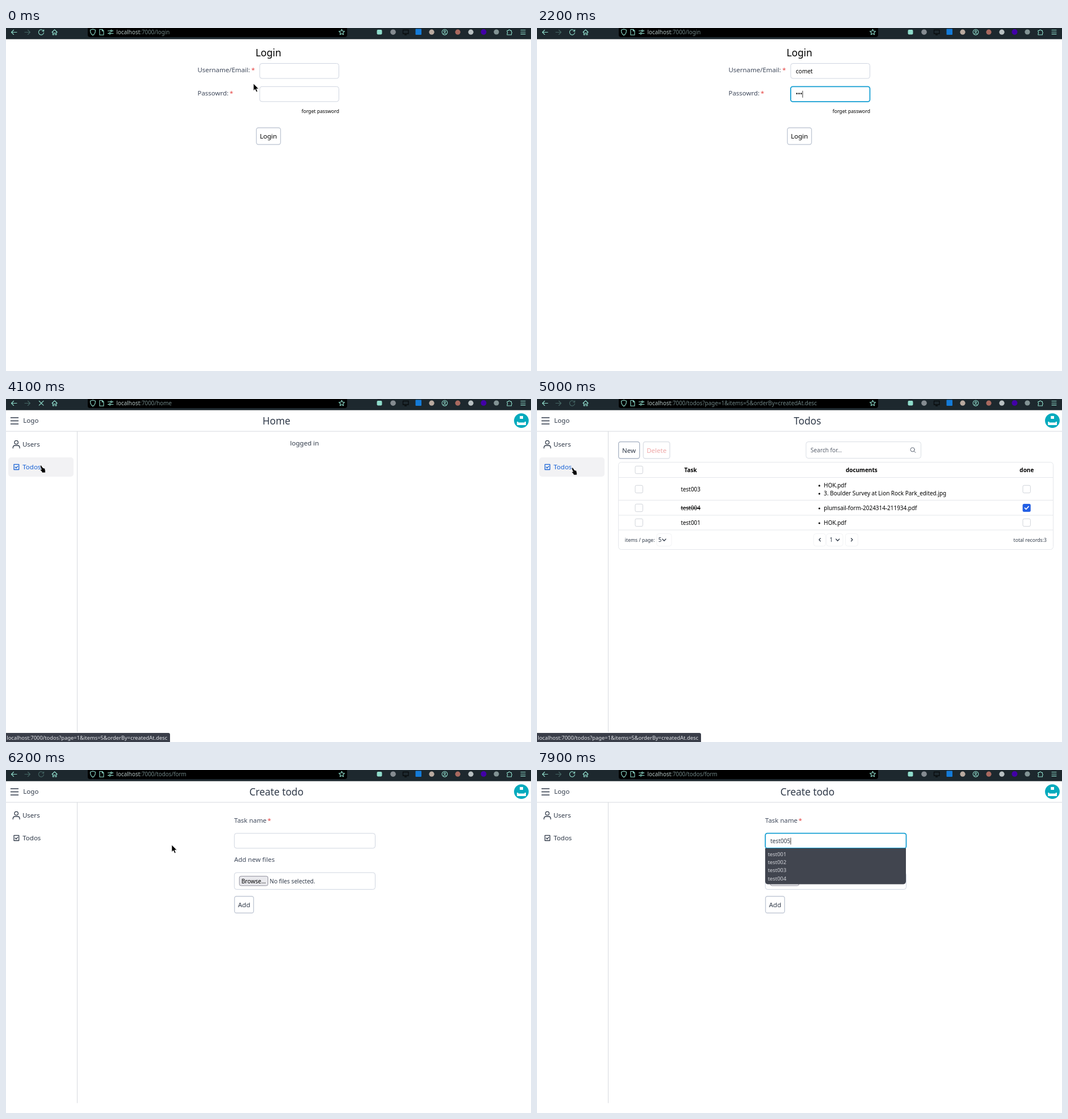
Write an HTML page that moves like this. It is 925 px wide and 605 px high and loops after 8000 ms.

```html
<!DOCTYPE html>
<html lang="en">
<head>
<meta charset="utf-8">
<title>Todo app</title>
<style>
html, body { margin: 0; width: 100%; height: 100%; overflow: hidden; background: #fff; }
svg { display: block; width: 925px; height: 605px; }
text { font: 11.56px "Noto Sans", "Open Sans", sans-serif; white-space: pre; }
.ink { fill: #303a49; }
.title { font-size: 17.3px; text-anchor: middle; }
.label { font-size: 11.45px; font-weight: 500; fill: #404a5c; }
.star { fill: #e5413f; }
.small { font-size: 10.12px; }
.tiny { font-size: 8.65px; }
.row { font-size: 9.95px; font-weight: 500; }
.head { font-size: 10px; font-weight: 700; text-anchor: middle; }
.mid { text-anchor: middle; }
.end { text-anchor: end; }
.box { fill: #fff; stroke: #cfd5e0; }
.btn { fill: #fff; stroke: #c3cad6; stroke-width: 1.4; }
.rule { fill: none; stroke: #e4e7eb; }
.focus { fill: #fff; stroke: #159fd3; stroke-width: 1.8; }
.line { fill: none; stroke: #303a49; stroke-width: 1.3; stroke-linecap: round; stroke-linejoin: round; }
.bar { fill: none; stroke: #8fdccb; stroke-width: 1.1; stroke-linecap: round; stroke-linejoin: round; }
.dim { opacity: .35; }
.pop { fill: #41454f; }
.pop-text text { font-size: 9.4px; fill: #d3d5da; }
.status text { font-size: 9.37px; fill: #e4e6ea; }
.status path { fill: #3a3e49; }
.url { font-size: 9.88px; fill: #6f8585; }
.url tspan { fill: #b9cac8; }
.check { fill: #fff; stroke: #d0d4da; }
.caret { stroke: #000; stroke-width: .8; }
.hot .ink { fill: #1a63d6; }
.hot .line { stroke: #1a63d6; }
</style>
</head>
<body>
<!-- data-on lists the spans, in ms, during which an element shows -->
<svg viewBox="0 0 925 605">
  <defs>
    <g id="tick"><path d="M-3.2 .2L-1 2.5 3.4-2.4" fill="none" stroke="#fff" stroke-width="1.7" stroke-linecap="round" stroke-linejoin="round"/></g>
    <rect id="check" class="check" x="-6.7" y="-6.7" width="13.4" height="13.4" rx="2.4"/>
    <path id="down" class="line" d="M-3-1.5L0 1.7 3-1.5"/>
  </defs>
  <rect width="925" height="605" fill="#fff"/>

  <!-- Browser bar -->
  <rect width="925" height="19.7" fill="#1d282e"/>
  <path d="M144 0H601V12a4 4 0 0 1-4 4H148a4 4 0 0 1-4-4Z"/>
  <g class="bar">
    <path d="M19 7.5H9.5M13.5 3.5L9.5 7.5 13.5 11.5"/>
    <path class="dim" d="M33 7.5H42.5M38.5 3.5L42.5 7.5 38.5 11.5"/>
    <g data-on="0-4100 4500-5400 5700-8000"><path id="reload" d="M66 5.2A4.6 4.6 0 1 0 66.6 8M66.6 3V5.8H63.8"/></g>
    <path data-on="4100-4500 5400-5700" d="M58.3 3.5L66 11.2M66 3.5L58.3 11.2"/>
    <path d="M81 7.5L85.6 3 90.2 7.5M82.4 6.8V12H84.3V8.8H87V12H88.8V6.8"/>
    <path d="M153 2L157.5 3.6C157.6 8 156.3 11 153 12.8 149.700 11 148.400 8 148.500 3.600Z"/>
    <path d="M165 2.5H169.500L172 5V12.300H165ZM169.300 2.700V5.200H171.800"/>
    <path d="M179.500 5H184M187 5H189M179.500 9.500H181.500M184.500 9.500H189"/><circle cx="185.500" cy="5" r="1.400"/><circle cx="183" cy="9.500" r="1.400"/>
    <path id="fav" d=""/>
    <circle cx="773" cy="7.300" r="4.800"/><circle cx="773" cy="6" r="1.500"/><path d="M770.300 10.500Q773 7.500 775.700 10.500"/>
    <path d="M883 4.500H885.300A1.500 1.500 0 0 1 888.300 4.500H890.500V7A1.500 1.500 0 0 1 890.500 9.700V12H883V9.700A1.500 1.500 0 0 0 883 7Z"/>
    <path d="M907 3.800H915M907 7.200H915M907 10.600H915"/>
  </g>
  <rect x="653.500" y="3" width="9" height="8.500" rx="2" fill="#8fdccb"/>
  <circle cx="682" cy="7.200" r="4.800" fill="#858c91"/>
  <path d="M699.500 3.500H709V10H699.500ZM702 12H706" fill="none" stroke="#080c0e" stroke-width="1.300"/>
  <rect x="721.500" y="1.500" width="10.500" height="10.500" rx="1" fill="#147bd8"/>
  <circle cx="750" cy="7.200" r="4.600" fill="#b9aaa0"/>
  <circle cx="796" cy="7.200" r="4.600" fill="#a9695f"/>
  <circle cx="819" cy="7.200" r="4.600" fill="#b8c0c2"/>
  <circle cx="841.500" cy="7" r="5" fill="#4200a8"/>
  <circle cx="864" cy="7" r="4.600" fill="#829394"/>
  <text class="url" x="194.500" y="11"><tspan>localhost</tspan>:7000/<tspan id="path" style="fill:inherit"></tspan></text>

  <!-- Login -->
  <g data-on="0-2500">
    <text class="title" x="462.300" y="49.500">Login</text>
    <text class="label" x="337.500" y="78">Username/Email:</text><text class="label star" x="432.300" y="78">*</text>
    <text class="label" x="337.500" y="119">Passowrd:</text><text class="label star" x="394" y="119">*</text>
    <rect class="box" x="447" y="62.500" width="139.500" height="26.500" rx="4"/>
    <rect class="box" x="447" y="103.300" width="139.500" height="26.500" rx="4"/>
    <rect class="focus" data-on="300-1600" x="447" y="62.500" width="139.500" height="26.500" rx="3.600"/>
    <rect class="focus" data-on="1600-2500" x="447" y="103.300" width="139.500" height="26.500" rx="3.600"/>
    <text class="tiny end" x="587" y="150">forget password</text>
    <rect class="btn" x="441.200" y="176" width="42.500" height="29.500" rx="3.500"/>
    <text class="mid" x="462.300" y="194.500">Login</text>
  </g>

  <!-- App shell -->
  <g data-on="2500-8000">
    <path class="line" d="M8.500 33H21.500M8.500 38.500H21.500M8.500 44H21.500" style="stroke-width:1.600"/>
    <text class="ink" x="30.300" y="42.300">Logo</text>
    <text class="ink title" id="title" x="476.500" y="45"></text>
    <circle cx="908" cy="38.200" r="12.900" fill="#04aabd"/>
    <path d="M905.300 30H911V35H905.300ZM900.300 40H902.500V41.500H913.700V40H916V46H900.300Z" fill="#fff"/>
    <path d="M0 57H925M125.500 57V587.500" class="rule" style="stroke:#d6d9de"/>
    <g class="line"><circle cx="18.200" cy="76.500" r="3.200"/><path d="M12.300 86.700V85.500Q12.600 82 16 82H20.500Q23.800 82 24.100 85.500V86.700"/></g>
    <text class="ink" x="28.900" y="84.400">Users</text>
    <rect data-on="3700-5100" x="4" y="103" width="115" height="34" rx="5" fill="#f2f2f4"/>
    <g id="todos">
      <path class="line" d="M14 115.400H22.700V124.500H14ZM16.200 120L17.900 121.700 20.800 118.400"/>
      <text class="ink" x="29.200" y="124">Todos</text>
    </g>
  </g>
  <text class="ink" data-on="2500-4500" x="500.500" y="82">logged in</text>

  <!-- Todo list -->
  <g data-on="4500-5700">
    <rect class="btn" x="143.700" y="75.500" width="37" height="29.500" rx="3.500" style="stroke:#aeb8c8"/>
    <text class="ink mid" x="162" y="94.500">New</text>
    <rect class="btn" x="187.300" y="75.500" width="46.700" height="29.500" rx="3.500" style="stroke:#dde1e7"/>
    <text class="mid" x="210.700" y="94.500" fill="#efa6a6">Delete</text>
    <rect class="box" x="474" y="75.500" width="202.500" height="29" rx="4" style="stroke:#dadee4"/>
    <text class="small" x="482" y="94" fill="#59616e">Search for...</text>
    <g class="line" style="stroke:#5d6674;stroke-width:1"><circle cx="661.700" cy="89.300" r="3.600"/><path d="M664.400 92L667 94.600"/></g>
    <rect class="rule" x="143.500" y="111.500" width="766" height="154" rx="5"/>
    <path class="rule" d="M143.500 138.500H909.500M143.500 178.500H909.500M143.500 205H909.500M143.500 231H909.500"/>
    <text class="head" x="270.700" y="129">Task</text>
    <text class="head" x="571.800" y="129">documents</text>
    <text class="head" x="862.800" y="129">done</text>
    <use href="#check" x="179.700" y="125"/>
    <g id="rows"></g>
    <g transform="translate(862.700 192)"><rect x="-7" y="-7" width="14" height="14" rx="2.500" fill="#235fe5"/><use href="#tick"/></g>
    <g fill="none" stroke="#f2f3f5"><rect x="211" y="237.500" width="26" height="22" rx="4"/><rect x="487.500" y="237.500" width="21" height="22" rx="4"/><rect x="510" y="237.500" width="29" height="22" rx="4"/><rect x="543.500" y="237.500" width="22" height="22" rx="4"/></g>
    <text class="tiny ink" x="154.800" y="251.500">items / page:</text>
    <text class="small ink" x="213.800" y="252.300">5</text><use href="#down" x="224" y="248.500"/>
    <path class="line" d="M499.300 245.800L497 248.300 499.300 250.800M553.600 245.800L555.900 248.300 553.600 250.800"/>
    <text class="small ink" x="515.500" y="252.300">1</text><use href="#down" x="529.700" y="248.500"/>
    <text class="tiny ink end" x="898" y="251.500">total records:3</text>
  </g>

  <!-- New todo form -->
  <g data-on="5700-8000">
    <text class="label" x="402" y="93">Task name</text><text class="label star" x="460.700" y="93">*</text>
    <rect class="box" x="402.300" y="111.700" width="248.200" height="26.300" rx="4"/>
    <rect class="focus" data-on="6400-8000" x="402.300" y="111.700" width="248.200" height="26.300" rx="3.600"/>
    <text class="label" x="402" y="162">Add new files</text>
    <rect class="box" x="402.300" y="181" width="248.200" height="29.600" rx="4"/>
    <rect x="411.200" y="187.300" width="50.300" height="16.700" rx="2.800" fill="#e9e9ed" stroke="#8f8f9b"/>
    <text class="small mid" x="436.300" y="199.700">Browse...</text>
    <text class="small ink" x="464.500" y="199.700">No files selected.</text>
    <rect class="btn" x="402.600" y="222.800" width="33.700" height="29.500" rx="3.500"/>
    <text class="ink mid" x="419.500" y="242">Add</text>
  </g>

  <g id="popups"></g>
  <text class="small" id="user" x="456" y="79.700"></text>
  <text class="small" id="pass" x="456" y="120.300"></text>
  <text class="small ink" id="task" x="411.200" y="129"></text>
  <path class="caret" id="caret" d="M0-9.500V2.500"/>

  <g class="status" data-on="3800-5100"><path d="M0 589H286a3 3 0 0 1 3 3V605H0Z"/><text x="1.300" y="600.700">localhost:7000/todos?page=1&amp;items=5&amp;orderBy=createdAt.desc</text></g>
  <g class="status" data-on="5200-5700"><path d="M0 589H119a3 3 0 0 1 3 3V605H0Z"/><text x="1.300" y="600.700">localhost:7000/todos/form</text></g>

  <g id="cursor" stroke="#fff" stroke-width=".7" stroke-linejoin="round">
    <path id="arrow" d="M0 0V12.500L2.900 9.900 5 14.800 7.200 13.900 5.200 9.200H9Z"/>
    <path id="hand" d="M.3.500Q1.500-.5 2.500.7L5 4.500 8.500 5.500 9.300 9.500V13H3.500L3 11 .2 8.300Q.3 7 1.700 7.300L2.500 7.500.6 3Z"/>
    <path id="beam" d="M-2.500-6H-.5L0-5.500.5-6H2.500M0-5.500V5.500M-2.500 6H-.5L0 5.500.5 6H2.500" fill="none" stroke="#111" stroke-width="1.100"/>
  </g>
</svg>
<script>
const LOOP = 8000, STEP = 100;
const $ = id => document.getElementById(id);

// Five-pointed bookmark star
$("fav").setAttribute("d", "M" + Array.from({ length: 10 }, (_, i) => {
  const r = i % 2 ? 2.4 : 5.2, a = (i / 5 - .5) * Math.PI;
  return `${591.5 + r * Math.cos(a)} ${7.5 + r * Math.sin(a)}`;
}).join("L") + "Z");

// Table rows: centre line, task, documents
const rows = [
  [159, "test003", ["HOK.pdf", "3. Boulder Survey at Lion Rock Park_edited.jpg"]],
  [192, "test004", ["plumsail-form-2024314-211934.pdf"]],
  [218, "test001", ["HOK.pdf"]]
];
$("rows").innerHTML = rows.map(([y, task, docs], i) => {
  const strike = i === 1 ? ' text-decoration="line-through"' : "";
  const list = docs.map((doc, n) => {
    const base = y + 4 + (n - (docs.length - 1) / 2) * 14.2;
    return `<circle cx="497.5" cy="${base - 3}" r="1.6"/><text class="row" x="505.3" y="${base}">${doc}</text>`;
  }).join("");
  return `<use href="#check" x="179.700" y="${y}"/><use href="#check" x="862.700" y="${y}"/>` +
    `<text class="row mid" x="270.700" y="${y + 4}"${strike}>${task}</text>${list}`;
}).join("");

// Suggestion lists under the focused field
function popup(on, x, y, width, names) {
  const h = names.length * 14.1 + 7.2, w = width - 10;
  const items = names.map((name, i) => `<text x="${x + 4.7}" y="${y + 14.2 + i * 14.1}">${name}</text>`).join("");
  return `<g class="pop-text" data-on="${on}"><path class="pop" d="M${x} ${y}h${width}v${h - 5}a5 5 0 0 1-5 5h${-w}a5 5 0 0 1-5-5Z"/>${items}</g>`;
}
const users = ["comet", "comnet", "cedar", "cello", "cobalt", "candle"];
const tasks = ["test001", "test002", "test003", "test004", "test1", "test"];
$("popups").innerHTML =
  popup("1000-1200", 446, 89, 140, users) +
  popup("1200-1500", 446, 89, 140, users.slice(0, 2)) +
  popup("6600-7700", 402, 138, 248, tasks) +
  popup("7700-8000", 402, 138, 248, tasks.slice(0, 4));

// Tracks of [start, value]; the latest started one holds
const pick = (track, t) => track.filter(k => k[0] <= t).pop()[1];
const tracks = {
  path: [[0, "login"], [2500, "home"], [4500, "todos?page=1&items=5&orderBy=createdAt.desc"], [5700, "todos/form"]],
  title: [[0, ""], [2500, "Home"], [4500, "Todos"], [5700, "Create todo"]],
  user: [[0, ""], [900, "c"], [1100, "co"], [1300, "com"], [1400, "come"], [1500, "comet"], [2500, ""]],
  pass: [[0, ""], ...[1, 2, 3, 4, 5].map(n => [1900 + n * 100, "•".repeat(n)]), [2500, ""]],
  task: [[0, ""], [6500, "t"], [6600, "te"], [6700, "tes"], [6800, "test"], [7700, "test0"], [7800, "test00"], [7900, "test005"]]
};
const focus = [[0, ""], [300, "user"], [1600, "pass"], [2500, ""], [6400, "task"]];

// Pointer poses: time, x, y, shape
const poses = [
  [0, 436, 98, "arrow"], [200, 455, 82, "beam"], [300, 462, 78, "beam"], [900, 462, 78, ""],
  [2600, 474, 75, "arrow"], [2700, 481, 71, "arrow"], [3100, 481, 71, "arrow"],
  [3400, 360, 90, "arrow"], [3700, 112, 113, "hand"], [4000, 60, 117, "hand"], [4400, 60, 117, "hand"],
  [5000, 61, 121, "hand"], [5100, 108, 110, "arrow"], [5200, 147, 95, "hand"], [5300, 160, 90, "hand"],
  [5600, 163, 91, "hand"], [5700, 195, 102, "arrow"], [6000, 292, 132, "arrow"], [6200, 292, 132, "arrow"],
  [6400, 430, 125, "beam"], [6500, 430, 125, ""], [8000, 430, 125, ""]
];

const timed = [...document.querySelectorAll("[data-on]")].map(el => ({
  el, spans: el.dataset.on.split(" ").map(s => s.split("-").map(Number))
}));

function render(now) {
  const t = Math.floor(now % LOOP / STEP) * STEP;
  const within = (a, b) => t >= a && t < b;

  for (const { el, spans } of timed) el.style.display = spans.some(s => within(...s)) ? "" : "none";
  for (const id in tracks) {
    const value = pick(tracks[id], t);
    if ($(id).textContent !== value) $(id).textContent = value;
  }
  $("reload").classList.toggle("dim", within(4500, 5100) || within(5700, 6300));
  $("todos").classList.toggle("hot", within(3700, 5100));

  const field = $(pick(focus, t));
  $("caret").style.display = field ? "" : "none";
  if (field) {
    const x = +field.getAttribute("x") + field.getComputedTextLength() + .6;
    $("caret").setAttribute("transform", `translate(${x} ${field.getAttribute("y")})`);
  }

  const i = poses.findIndex((p, n) => n + 1 === poses.length || poses[n + 1][0] > t);
  const a = poses[i], b = poses[i + 1] || a, k = (t - a[0]) / (b[0] - a[0] || 1);
  $("cursor").setAttribute("transform", `translate(${a[1] + (b[1] - a[1]) * k} ${a[2] + (b[2] - a[2]) * k})`);
  for (const shape of ["arrow", "hand", "beam"]) $(shape).style.display = a[3] === shape ? "" : "none";
}

const start = performance.now();
function loop() {
  render(performance.now() - start);
  requestAnimationFrame(loop);
}
loop();
</script>
</body>
</html>
```
